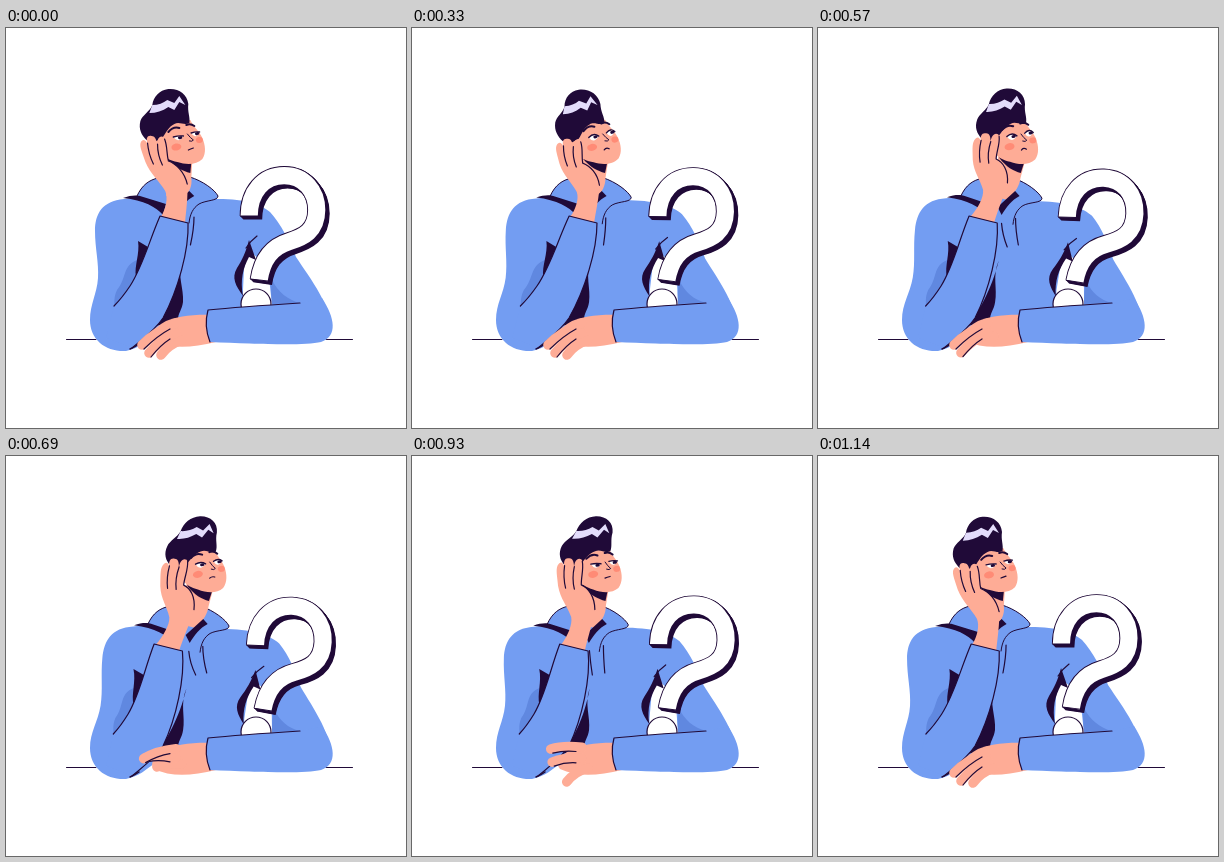
Recreate the animation shown at these times as an HTML page with a canvas. Size 400 px wide and 400 px high, loop 1170 ms.

```html
<!DOCTYPE html>
<html>
<head>
<meta charset="utf-8">
<style>
html, body { margin: 0; height: 100%; overflow: hidden; background: #fff }
canvas { display: block; width: 100vw; height: 100vh }
</style>
</head>
<body>
<canvas width="400" height="400"></canvas>
<script>
const ctx = document.querySelector('canvas').getContext('2d');
const PERIOD = 1170;
const BLUE = '#739df2', SHADE = '#6088e0', INK = '#200a38', SKIN = '#feac96', BLUSH = '#ff8b76', SHINE = '#e3dcfb';
const clamp = v => Math.max(0, Math.min(1, v));
const ramp = (t, a, b) => { const u = clamp((t - a) / (b - a)); return u * u * (3 - 2 * u); };
const pulse = (t, a, b, c, d) => ramp(t, a, b) - ramp(t, c, d);
const still = (x, y) => [x, y];

// Path whose coordinate pairs are moved by a warp function
const shape = (d, warp) => new Path2D(d.replace(/(-?[\d.]+) (-?[\d.]+)/g, (_, x, y) => warp(+x, +y).join(' ')));

function fill(d, color, warp = still) {
  ctx.fillStyle = color;
  ctx.fill(shape(d, warp));
}

function line(d, warp = still, width = 1.2, color = INK) {
  ctx.strokeStyle = color;
  ctx.lineWidth = width;
  ctx.stroke(shape(d, warp));
}

function oval(x, y, rx, ry, color, warp) {
  ctx.beginPath();
  ctx.ellipse(...warp(x, y), rx, ry, -0.2, 0, 7);
  ctx.fillStyle = color;
  ctx.fill();
}

function draw(t) {
  const turn = delay => Math.cos((t - delay) / PERIOD * 2 * Math.PI);
  const sway = delay => (1 - turn(delay)) / 2;
  const lean = sway(0), nod = sway(50), bob = turn(235) - 0.3;
  const open = pulse(t, 60, 170, 620, 780);

  const body = (x, y) => {
    const k = lean * clamp((275 - y) / 90);
    return [x + 10 * k, y + 0.03 * (x - 140) * k];
  };
  const collar = (x, y) => [x + 12 * lean, y + 0.03 * (x - 140) * lean];
  const neck = (x, y) => [x + (14 + 8 * clamp((165 - y) / 30)) * nod, y];
  const head = (x, y) => {
    const a = -0.06 * bob, dx = x - 180, dy = y - 125;
    return [180 + dx - dy * a + 22 * nod, 125 + dy + dx * a];
  };
  const hair = (x, y) => head(x + nod * clamp((y - 80) / 10) * 2 - 6 * bob * clamp((105 - y) / 44), y);
  const arm = (x, y) => [x + 5.5 * bob * clamp((290 - y) / 100), y];
  const palm = (x, y) => {
    const u = clamp((190 - y) / 78);
    return [x + 24 * sway(58) * u + 5.5 * bob * (1 - u), y + 5 * bob * u];
  };

  ctx.fillStyle = '#fff';
  ctx.fillRect(0, 0, 400, 400);
  ctx.lineCap = ctx.lineJoin = 'round';
  line('M60.5 311.5L90 311.5M320 311.5L346.5 311.5', still, 1);

  // Torso and right upper arm
  fill('M118 171C96 173 89 186 89 203C89 220 93 235 92 250C91 266 84 276 84 292C84 312 100 324 120 323C133 320 140 314 150 306L205 300L237 290L237 262L238 240L243 222L262 240L266 277L322 300C329 283 304 250 290 229C284 214 275 196 264 184C256 177 240 171 212 171C190 168 150 166 118 171Z', BLUE, body);
  fill('M266 252C264 262 266 270 266 276L294 275C282 272 272 264 266 252Z', SHADE, body);
  fill('M243 212L250 232L243 229C237 240 234 252 237 268C230 258 225 250 231 240C236 232 240 224 243 212Z', INK, body);
  line('M240 220C243 215 247 211 251 208', body);
  fill('M176 232C171 248 178 260 177 274C176 282 172 285 172 292L150 298C160 285 172 262 176 232Z', INK, body);
  fill('M131 232C116 238 121 250 111 262C107 270 109 277 108 279C118 272 126 256 131 246Z', SHADE, arm);
  fill('M132 213L142 219L130 249C128 238 134 226 132 213Z', INK, arm);

  // Hood and neck
  fill('M131 168C136 157 143 152 152 150L184 149C197 153 209 162 212 168C212 173 200 172 193 176C187 180 184 186 183 195L160 190L159 178Z', BLUE, collar);
  line('M131 168C136 157 143 152 152 150M184 149C197 153 209 162 212 168C212 173 200 172 193 176C187 180 184 186 183 195', collar, 1);
  fill('M117 170C124 167 131 167 134 168L160 176L157 187C150 179 138 172 117 170Z', INK, collar);
  fill('M160 122L186 132L185 150C186 158 184 163 176 172L160 168Z', SKIN, neck);
  fill('M183 163L188 168C180 172 175 179 170 187L166 179Z', INK, neck);
  fill('M160 124L185 134L184 145C176 143 168 139 160 130Z', INK, neck);
  const [sx, sy] = body(188, 189), swing = sway(60);
  line(`M${sx} ${sy}Q${sx} ${sy + 12} ${184 + 17 * swing} 217`);
  line(`M${sx - 14} ${sy + 5}Q${sx - 13} ${sy + 17} ${170 + 20 * swing} 219`);

  // Head
  fill('M150 95L184 92C187 99 193 103 196 110C199 117 200 125 196 131C190 137 180 137 171 134C158 132 148 122 148 105Z', SKIN, head);
  oval(170, 119, 5, 3.5, BLUSH, head);
  oval(193, 112, 3.5, 3, BLUSH, head);
  for (const [x, y, r] of [[172, 109, 5], [189, 105, 4.2]]) {
    const lid = `M${x - r} ${y}Q${x} ${y - 1.5 - 3.5 * open} ${x + r} ${y - 1}`;
    fill(`${lid}Q${x} ${y + 7} ${x - r} ${y}Z`, '#fff', head);
    line(`M${x + 1} ${y + 0.8 - open}L${x + 2.5} ${y + 0.5 - open}`, head, 2.8);
    line(lid, head, 1.4);
  }
  const lift = open * 1.5;
  line(`M162 ${104 - lift}Q167 ${98 - lift} 173 ${100 - lift}M180 ${97 - lift}Q184 ${95 - lift} 188 ${98 - lift}`, head, 2);
  line('M181 106Q184 110 187 112Q186 114 183 113', head, 1);
  line(`M182 122Q184 ${121 - 2 * open} 187 ${120 + open}`, head);
  fill('M156 110C160 104 162 99 168 96C173 93 178 98 183 95C184 89 181 84 182 76C181 66 172 60 162 61C153 62 147 69 146 77C144 83 136 87 134 93C132 101 135 107 140 112L148 114Z', INK, hair);
  fill('M143 85L146 77C152 77 157 75 161 72L168 75L173 68L179 77L173 74L168 82L162 79C156 83 150 85 143 85Z', SHINE, hair);

  // Raised hand and its sleeve
  fill('M155 189C160 180 162 170 159 163C153 153 144 146 139 134C136 125 133 119 134 115C136 110 139 112 141 116C139 110 141 107 145 108C149 108 150 113 151 117C150 111 153 107 157 109C160 112 160 124 162 133C170 136 178 144 181 156C182 168 180 183 179 195Z', SKIN, palm);
  line('M141 115Q142 126 147 136M151 116Q151 127 156 137M158 111C161 118 160 126 162 133C170 136 178 144 181 156', palm);
  fill('M154 188L182 195C183 222 172 262 157 290C149 302 138 310 126 320L100 310L108 278C112 274 118 267 124 258C137 238 143 213 154 188Z', BLUE, arm);
  line('M108 278C112 274 118 267 124 258C137 238 143 213 154 188L182 195C183 222 172 262 157 290C149 302 138 310 126 320', arm);
  line('M124 321Q129 319 133 316', still, 1.5);

  // Question mark
  ctx.beginPath();
  ctx.arc(250, 276, 15, 0, 7);
  ctx.fillStyle = '#fff';
  ctx.fill();
  ctx.strokeStyle = INK;
  ctx.lineWidth = 1.2;
  ctx.stroke();
  ctx.save();
  ctx.translate(212, 355);
  ctx.rotate(0.039 * sway(65));
  ctx.translate(-212, -355);
  ctx.lineCap = 'butt';
  const hook = 'M243 188C243 164 257 147.5 278 147.5C298 147.5 310.5 163 310.5 182C310.5 203 297 209 283 213.5C265 219 256 232 253 252';
  for (let d = 3.5; d >= 0; d -= 0.5) line(hook, (x, y) => [x + d, y + d], 19);
  line(hook, still, 17.2, '#fff');
  line('M234 188L252 188M244 251L262 253', still, 1);
  ctx.restore();

  // Tapping fingers and resting arm
  fill('M210 314L210 287C185 286 170 289 160 293C148 299 143 308 148 313C165 321 185 320 210 314Z', SKIN);
  const fingers = [
    [176, 312, 155, 327, 151, 311, 450, 600, 830, 950],
    [170, 305, 143, 325, 139, 298, 560, 730, 880, 1020],
    [170, 295, 136, 317, 139, 291, 600, 770, 900, 1080]
  ];
  fingers.forEach(([kx, ky, x0, y0, x1, y1, ...times], i) => {
    const up = pulse(t, ...times);
    const x = x0 + (x1 - x0) * up, y = y0 + (y1 - y0) * up, k = ky - 4 * up;
    line(`M${kx} ${k}Q${(kx + x) / 2 - 3} ${(k + y) / 2 - 3} ${x} ${y}`, still, 9.6, SKIN);
    if (i) line(`M${kx - 6} ${k + 6 - 2 * up}Q${(kx + x) / 2 - 2} ${(k + y) / 2 + 2} ${x + 2} ${y + 4}`);
  });
  fill('M202 282C231 279 262 277 294 275L316 270C329 290 332 308 315 314C298 318 250 316 204 314C200 304 199 293 202 282Z', BLUE);
  line('M294 275C262 277 231 279 202 282C199 293 200 304 204 314');
}

function frame(now) {
  draw(now % PERIOD);
  requestAnimationFrame(frame);
}
requestAnimationFrame(frame);
</script>
</body>
</html>
```
